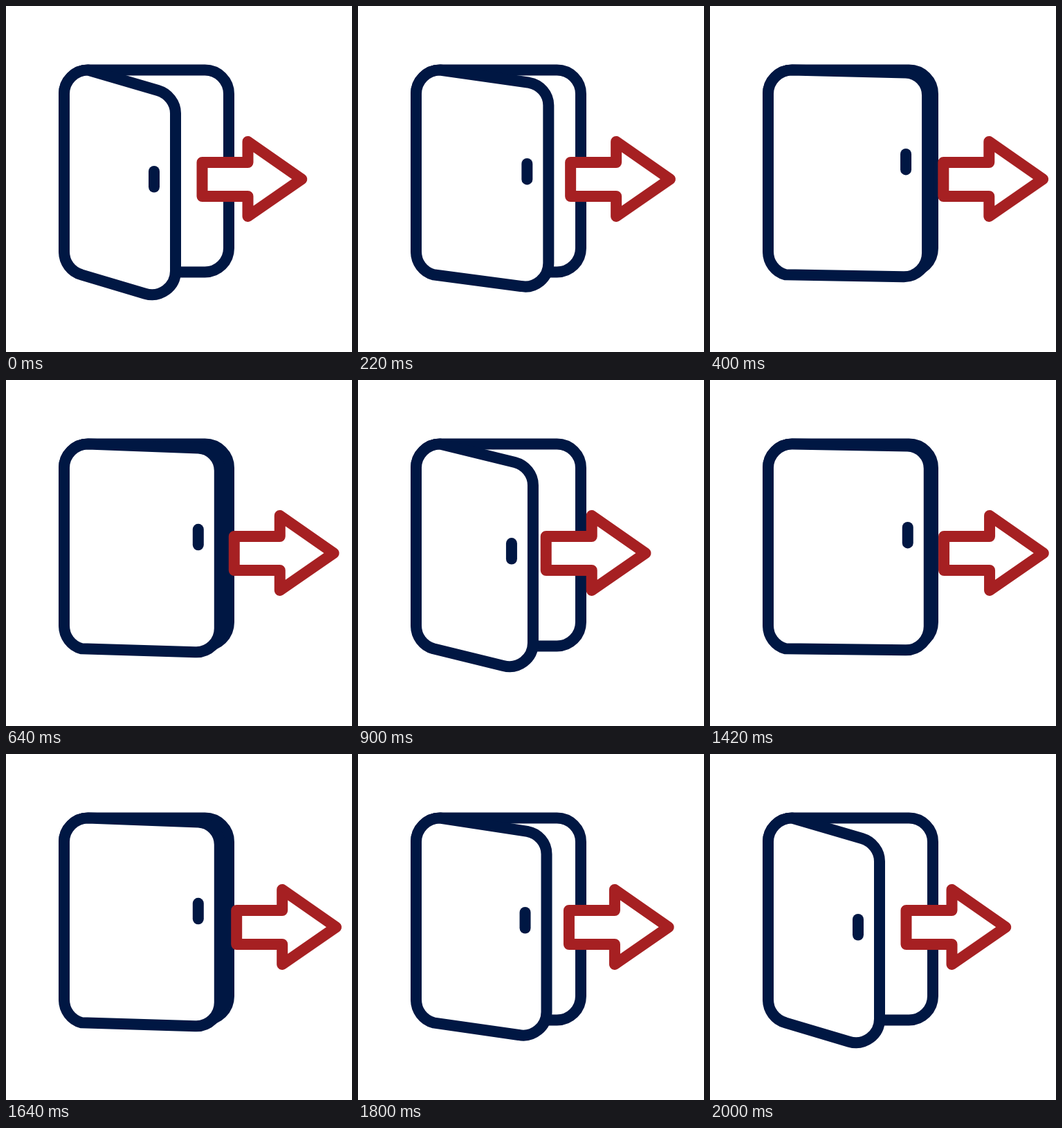
Recreate the animation shown at these times as an HTML page with a canvas. Size 500 by 500 pixels, loop 2.34 s.

```html
<!DOCTYPE html>
<html lang="en">
<head>
<meta charset="utf-8">
<title>Exit</title>
<style>
html, body { margin: 0; width: 100%; height: 100%; overflow: hidden; background: #fff; }
canvas { display: block; width: 500px; height: 500px; }
</style>
</head>
<body>
<canvas id="stage" width="500" height="500"></canvas>
<script>
const ctx = document.getElementById("stage").getContext("2d");
const NAVY = "#001743", RED = "#a62022";
const LOOP = 2340, MOVE = 2000, HALF = 500, STEP = 20, LAG = 4;

const mix = (a, b, k) => a + (b - a) * k;
const ease = k => (1 - Math.cos(Math.PI * k)) / 2;

// Eased value at time t through stops spaced HALF ms apart
function track(stops, t) {
  const i = Math.min(Math.floor(t / HALF), stops.length - 2);
  return mix(stops[i], stops[i + 1], ease(t / HALF - i));
}

function paint(path, color) {
  ctx.fillStyle = "#fff";
  ctx.strokeStyle = color;
  ctx.fill(path);
  ctx.stroke(path);
}

const frame = new Path2D();
frame.roundRect(84, 92.5, 238, 292, 34.5);

const arrow = new Path2D(
  "M283.5 226H349.5V196L427.3 250.2L349.5 304V275H283.5Z");

// Swinging edge of the door, open and closed
const topOpen = [219.5, 122, 234.5, 126.5, 245, 140, 245, 155];
const topShut = [290, 93.5, 307.5, 93.5, 322, 108, 322, 126];
const lowOpen = [245, 383, 245, 406, 223, 422, 201, 415.7];
const lowShut = [322, 354, 322, 373, 307, 388.5, 288, 388.5];

function door(k) {
  const path = new Path2D("M109 388.3C94 384 84 370.5 84 355V127C84 108 99.5 92.5 118.5 92.5");
  const corner = (open, shut) => {
    const [x, y, ...curve] = open.map((v, i) => mix(v, shut[i], k));
    path.lineTo(x, y);
    path.bezierCurveTo(...curve);
  };
  corner(topOpen, topShut);
  corner(lowOpen, lowShut);
  path.closePath();
  paint(path, NAVY);

  const x = mix(214, 291, k), y = mix(239, 211, k);
  const handle = new Path2D();
  handle.moveTo(x, y);
  handle.lineTo(x, y + 22.5);
  paint(handle, NAVY);
}

function draw(ms) {
  const t = Math.max(0, Math.min(ms, MOVE) - (ms < MOVE ? LAG : 0));
  ctx.clearRect(0, 0, 500, 500);
  ctx.lineWidth = 16;
  ctx.lineCap = ctx.lineJoin = "round";
  paint(frame, NAVY);
  door(track([0, 1, 0, 1, 0], t));
  ctx.save();
  ctx.translate(track([0, 60, -20, 60, 0], t), 0);
  paint(arrow, RED);
  ctx.restore();
}

const start = performance.now();
function tick() {
  const ms = (performance.now() - start) % LOOP;
  draw(Math.floor(ms / STEP) * STEP);
  requestAnimationFrame(tick);
}
tick();
</script>
</body>
</html>
```
